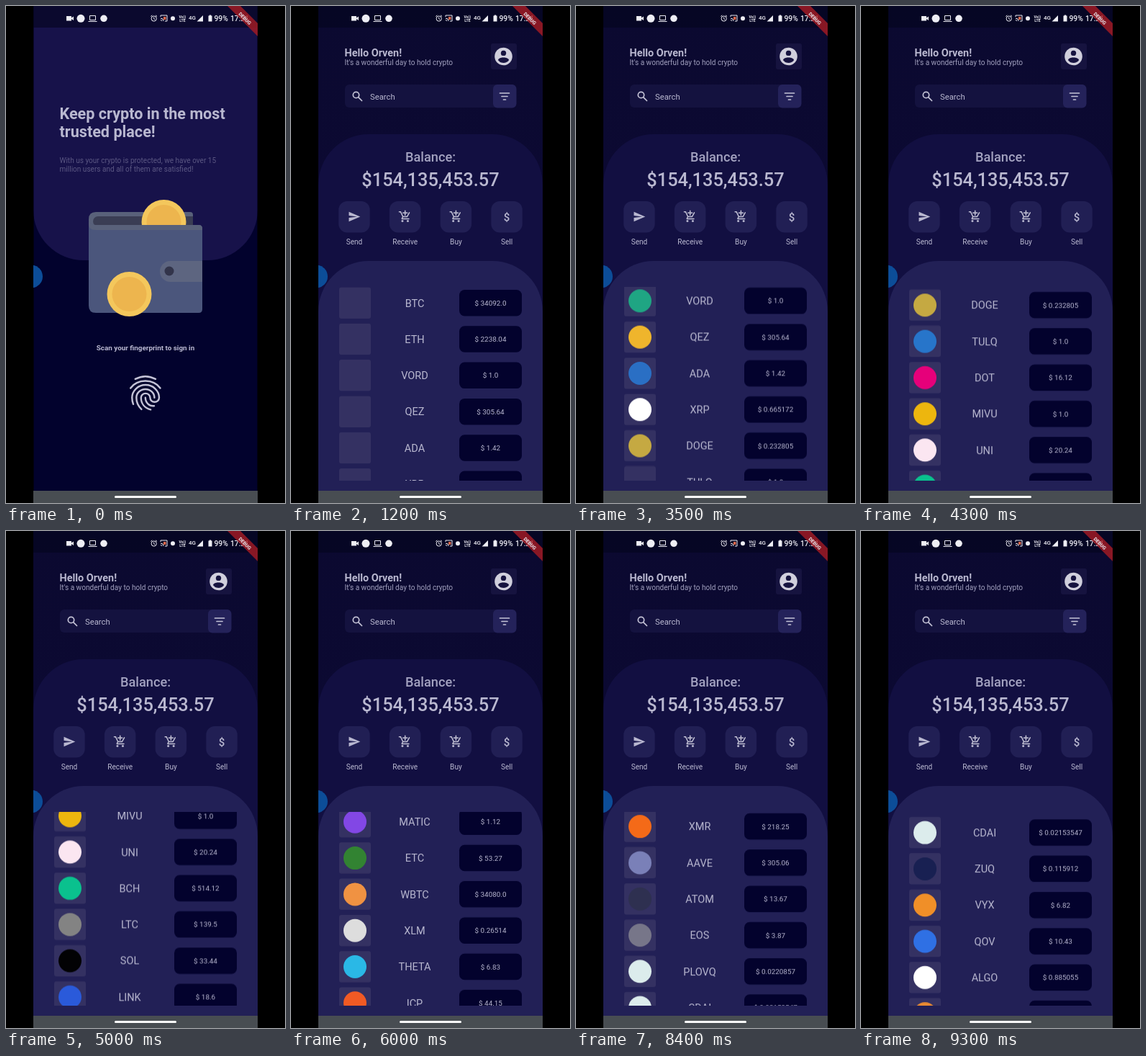
Recreate the animation shown at these times as an HTML page. Size 388 by 690 pixels, loop 9.4 s.

```html
<!DOCTYPE html>
<html lang="en">
<head>
<meta charset="utf-8">
<title>Wallet sign-in</title>
<style>
html, body { margin: 0; width: 100%; height: 100%; overflow: hidden; background: #000; }
svg { display: block; width: 388px; height: 690px; font-family: Roboto, sans-serif; fill: #b9b8d0; }
.mid { text-anchor: middle; }
.line { fill: none; stroke: #c4c3d6; stroke-linecap: round; }
.status { fill: #eeeef4; }
#home { animation: enter 9.4s linear infinite; }
#rows { animation: scroll 9.4s linear infinite; }
@keyframes enter {
  0%, 4.26% { opacity: 0; transform: translateY(172px); animation-timing-function: ease-out; }
  7.98%, 100% { opacity: 1; transform: none; }
}
@keyframes scroll {
  0%, 30.32% { transform: none; }
  37.234% { transform: translateY(-103.3px); }
  53.191% { transform: translateY(-469.3px); }
  74.468% { transform: translateY(-1056.3px); }
  89.362% { transform: translateY(-1309.6px); }
  98.936% { transform: translateY(-1552.6px); }
  100% { transform: translateY(-1579px); }
}
</style>
</head>
<body>
<svg viewBox="0 0 388 690">
  <defs>
    <clipPath id="phone"><rect x="38.5" width="311" height="690"/></clipPath>
    <clipPath id="list"><rect x="60" y="390.5" width="270" height="268"/></clipPath>
    <linearGradient id="header" x2="0" y2="1">
      <stop stop-color="#0b0930"/><stop offset="1" stop-color="#0d0a36"/>
    </linearGradient>
    <g id="coin"><circle r="31" fill="#f4c75c"/><circle r="24" fill="#edb54e"/></g>
    <g id="cart">
      <path class="line" stroke-width="2" d="M1 3h2.6l4.4 9h7.6l4.2-7.6M8 12l-1.8 3.2q-.5.8.8.8h12M12 1v8M8 5h8"/>
      <circle cx="7" cy="20" r="2"/><circle cx="17" cy="20" r="2"/>
    </g>
  </defs>
  <rect width="388" height="690" fill="#000"/>
  <g clip-path="url(#phone)">
    <g id="login">
      <rect x="38" width="312" height="690" fill="#02022d"/>
      <path d="M38 0H350V283a70 70 0 0 1-70 70H108a70 70 0 0 1-70-70z" fill="#17124a"/>
      <g font-size="21.6" font-weight="700">
        <text x="74.5" y="157">Keep crypto in the most</text>
        <text x="74.5" y="182">trusted place!</text>
      </g>
      <g font-size="10.05" fill="#5b5783">
        <text x="74.5" y="218">With us your crypto is protected, we have over 15</text>
        <text x="74.5" y="229.5">million users and all of them are satisfied!</text>
      </g>
      <path d="M125 286H256q4 0 4 4V320H115V296q0-10 10-10z" fill="#59617a"/>
      <path d="M128 292H260V306H128a7 7 0 0 1 0-14z" fill="#3a3d54"/>
      <use href="#coin" x="219.5" y="300"/>
      <path d="M115 298q2 6 10 6H268q5 0 5 5V421q0 5-5 5H125q-10 0-10-10z" fill="#4b567c"/>
      <path d="M115 298q2 6 10 6H268q5 0 5 5v2H125q-10 0-10-8z" fill="#59617a"/>
      <path d="M273 354H228.5a14.5 14.5 0 0 0 0 29H273z" fill="#5d6580"/>
      <circle cx="227" cy="368" r="6.5" fill="#32344a"/>
      <use href="#coin" x="171.5" y="400"/>
      <text class="mid" x="194" y="478" font-size="9.9" font-weight="700">Scan your fingerprint to sign in</text>
      <path class="line" transform="translate(164.7 508.1) scale(2.43)" d="M6.2 4Q12 1 17.8 4M3.5 9.2C7.5 3.7 16.5 3.7 20.5 9.2M9.75 21.3C7.5 19.2 6.84 17 6.84 14.7a5.16 4.9 0 0 1 10.32 0M12 14.7c0 2.8 2.2 5 5 4.7M15 21.5C11.5 20.6 9.5 18 9.5 14.7a2.6 2.45 0 0 1 5.2 0a2.58 2.45 0 0 0 5.16 0a7.75 7.3 0 0 0-15.5 0c0 1.2.2 2.4.7 3.7"/>
    </g>

    <g id="home">
      <rect x="38" width="312" height="690" fill="url(#header)"/>
      <path d="M38 690V248a70 70 0 0 1 70-70H280a70 70 0 0 1 70 70V690z" fill="#120f41"/>
      <path d="M38 690V424a70 70 0 0 1 70-70H280a70 70 0 0 1 70 70V690z" fill="#222056"/>
      <text x="74.5" y="69.5" font-size="14.4" font-weight="700">Hello Orven!</text>
      <text x="74.5" y="81.5" font-size="10.1" fill="#a09fbd">It's a wonderful day to hold crypto</text>
      <rect x="278" y="52" width="36" height="36" rx="3" fill="#16133f"/>
      <circle cx="295.5" cy="70" r="12.3" fill="#d0cfdc"/>
      <g fill="#16133f">
        <circle cx="295.5" cy="65.4" r="3.7"/>
        <path d="M288 75.2c.3-5 14.7-5 15 0q-2.800 3.800-7.500 3.800t-7.500-3.800z"/>
      </g>
      <rect x="75" y="109" width="238" height="32" rx="6" fill="#14123f"/>
      <rect x="281" y="109" width="32.500" height="32.500" rx="6" fill="#24225a"/>
      <path class="line" stroke-width="1.700" d="M93.900 126.900l4.600 4.600M290.500 121h13M293 125.500h8M295.500 130h3"/>
      <circle class="line" stroke-width="1.700" cx="90.500" cy="123.500" r="4.200"/>
      <text x="110" y="130.300" font-size="11.300">Search</text>
      <text class="mid" x="194" y="216" font-size="18.200" font-weight="500" fill="#a3a2c0">Balance:</text>
      <text class="mid" x="194" y="250.300" font-size="25.400" font-weight="500">$154,135,453.57</text>
      <g id="actions"></g>
      <g clip-path="url(#list)"><g id="rows"></g></g>
    </g>

    <rect x="38" width="312" height="30" fill="#060520" opacity=".65"/>
    <rect x="38" y="673" width="312" height="17" fill="#484d52"/>
    <rect x="151" y="680" width="86" height="3" rx="1.500" fill="#fff"/>
    <circle cx="35" cy="375.500" r="16" fill="#0c4d98"/>

    <g class="status" font-weight="500">
      <path d="M84 14h7v2.500l3-2v5.500l-3-2V20.500h-7z"/>
      <circle cx="104" cy="17.300" r="5.500"/>
      <path fill="none" stroke="#eeeef4" d="M116.500 13.500h8v6h-8zM114.500 21.500h12"/>
      <circle cx="136" cy="17.300" r="4.800"/>
      <g fill="none" stroke="#eeeef4">
        <circle cx="205.700" cy="17.500" r="3.600"/>
        <path d="M205.700 15.500v2.300l1.500 1M201.300 14.500l2-1.700M210 14.500l-2-1.700"/>
        <path d="M215 15v-2h9v8h-3M215 17q4 0 4 4M215 19.500q1.500 0 1.500 1.500"/>
      </g>
      <rect x="219" y="15" width="3.500" height="4" fill="#d9664a"/>
      <circle cx="232" cy="17.300" r="3"/>
      <g class="mid" font-size="5.200" font-weight="700">
        <text x="245.500" y="16.500">Vo))</text><text x="245.500" y="22">LTE</text>
      </g>
      <text x="254" y="19" font-size="8">4G</text>
      <path d="M274 13v8.500h-8.500z"/>
      <path d="M281.500 13.500h1.300v-1h2.400v1h1.300V21.500h-5z"/>
      <text x="289.500" y="21" font-size="10.300">99%</text>
      <text x="312" y="21" font-size="10.300">17:21</text>
    </g>
    <path d="M308 0H326L350 24V42z" fill="#a51c24" opacity=".82"/>
    <text class="mid status" transform="translate(331.300 18.300) rotate(45)" y="1" font-size="6.700" font-weight="700">DEBUG</text>
  </g>
</svg>
<script>
const LOOP = 9400, PITCH = 50.3;
const coins = `BTC 34092.0 f7931a|ETH 2238.04 627eea|VORD 1.0 1fa583|QEZ 305.64 efb52c|ADA 1.42 2a6fc4
XRP 0.665172 ffffff|DOGE 0.232805 c5a942|TULQ 1.0 2775ca|DOT 16.12 e6007a|MIVU 1.0 edb60e
UNI 20.24 fbe6f1|BCH 514.12 0ac18e|LTC 139.5 838383|SOL 33.44 020204|LINK 18.6 2a5ada
MATIC 1.12 8247e5|ETC 53.27 328332|WBTC 34080.0 f09242|XLM 0.26514 dddddd|THETA 6.83 2ab8e6
ICP 44.15 f15a24|VET 0.084336 2b9fe0|DAI 1.0 f0ae36|FIL 56.75 0d90f5|TRX 0.065046 b92b2c
SHIB 0.00000843 f0651c|XMR 218.25 f46a18|AAVE 305.06 7a80b8|ATOM 13.67 2e3050|EOS 3.87 777689
PLOVQ 0.0220857 dcecec|CDAI 0.02153547 dcecec|ZUQ 0.115912 182052|VYX 6.82 f08f28|QOV 10.43 2f70e4
ALGO 0.885055 ffffff|KSM 210.4 e88a32`.split(/[|\n]/).map(c => c.split(" "));

rows.innerHTML = coins.map(([symbol, price, color], i) => `
  <g transform="translate(0 ${412.3 + i * PITCH})">
    <rect x="67" y="-21.800" width="44" height="43.500" rx="3" fill="#343162"/>
    <circle class="icon" cx="89" r="16" fill="#${color}"/>
    <text class="mid" x="172" y="5.200" font-size="14.500">${symbol}</text>
    <rect x="234" y="-18.300" width="87" height="36.500" rx="7.500" fill="#03022d"/>
    <text class="mid" x="277.500" y="3.500" font-size="9.900">$ ${price}</text>
  </g>`).join("");

const icons = {
  Send: '<path d="M2 21 23 12 2 3v7l15 2-15 2z"/>',
  Receive: '<use href="#cart"/>',
  Buy: '<use href="#cart"/>',
  Sell: '<text class="mid" x="12" y="19" font-size="20" font-weight="500">$</text>'
};
actions.innerHTML = Object.entries(icons).map(([label, icon], i) => `
  <g transform="translate(${88 + i * 70.7} 292.500)">
    <rect x="-21.800" y="-21.500" width="43.500" height="43.500" rx="12" fill="#211f54"/>
    <g transform="translate(-9 -9) scale(.75)">${icon}</g>
    <text class="mid" y="38.500" font-size="10.100">${label}</text>
  </g>`).join("");

// The first rows receive their icons one after another; later ones are ready on arrival.
document.querySelectorAll(".icon").forEach((icon, i) => {
  if (i > 7) return;
  const start = i < 7 ? 1400 + i * 130 : 3700;
  icon.animate([
    { opacity: 0, offset: 0 },
    { opacity: 0, offset: start / LOOP },
    { opacity: 1, offset: (start + 100) / LOOP },
    { opacity: 1, offset: 1 }
  ], { duration: LOOP, iterations: Infinity });
});
</script>
</body>
</html>
```
